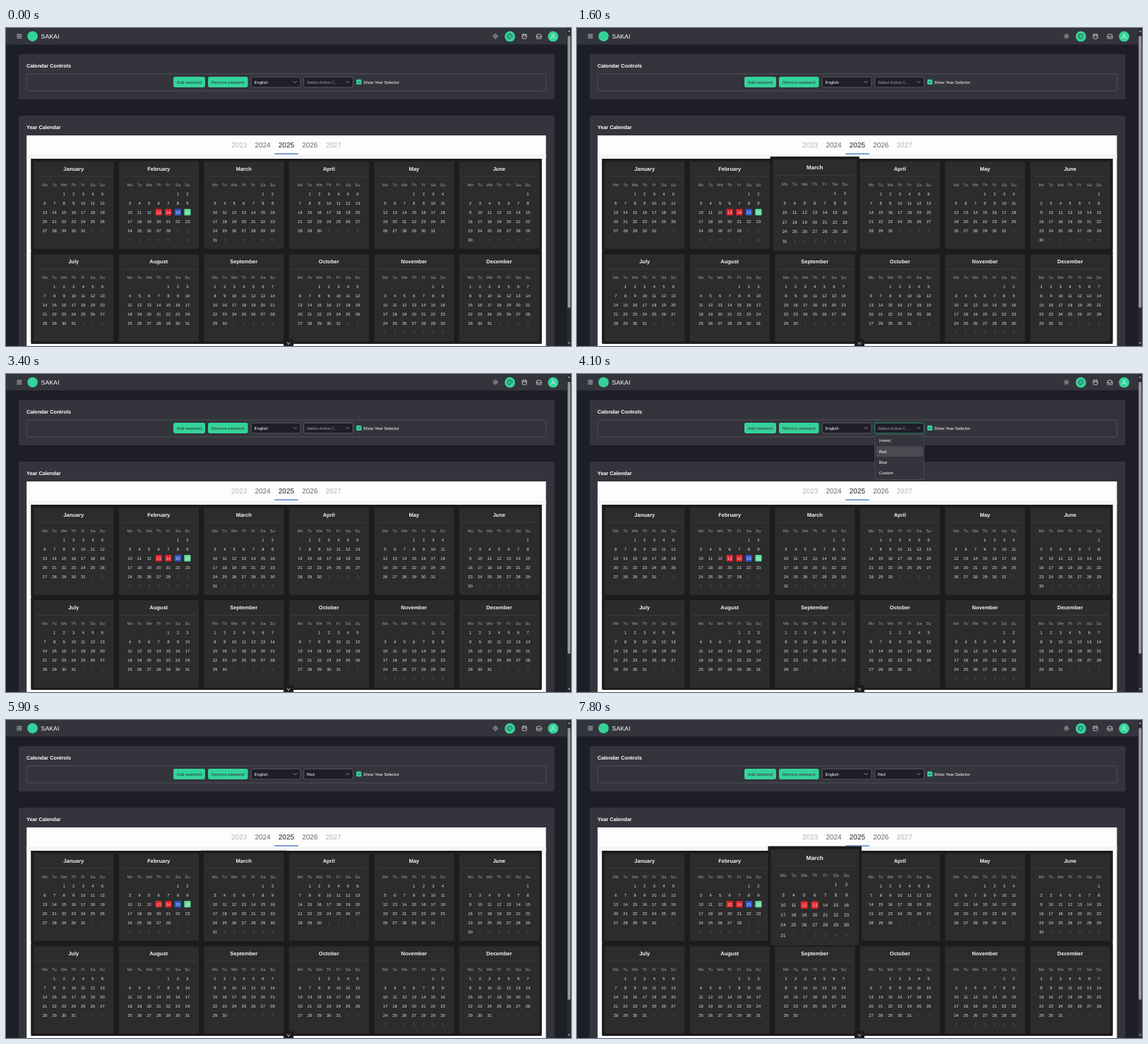
These frames come from a looping animation (800 by 450 pixels, 8 s). An HTML page:

```html
<!DOCTYPE html>
<html lang="en">
<head>
<meta charset="utf-8">
<title>Year calendar</title>
<style>
  html, body { margin: 0; width: 100%; height: 100%; overflow: hidden; background: #1d1e27; }
  svg { display: block; width: 800px; height: 450px; }
  text { font-family: "Liberation Sans", Arial, sans-serif; text-rendering: geometricPrecision; }
</style>
</head>
<body>
<svg id="stage" viewBox="0 0 800 450"></svg>
<script>
const LOOP = 8000;
const GREEN = '#34d399', CARD = '#34343d', GROUND = '#1d1e27', LINE = '#616268', RED = '#e0242b';
const stage = document.getElementById('stage');

function add(parent, tag, attrs) {
  const node = document.createElementNS('http://www.w3.org/2000/svg', tag);
  for (const key in attrs) node.setAttribute(key, attrs[key]);
  parent.appendChild(node);
  return node;
}

function rect(parent, x, y, width, height, fill, rx = 0, more = {}) {
  return add(parent, 'rect', { x, y, width, height, fill, rx, ...more });
}

function circle(parent, cx, cy, r, fill) {
  return add(parent, 'circle', { cx, cy, r, fill });
}

// y is the middle of the capital letters
function label(parent, x, y, str, size, fill, more = {}) {
  const node = add(parent, 'text', { x, y: y + size * 0.355, 'font-size': size, fill, ...more });
  node.textContent = str;
  return node;
}

function stroke(parent, d, color, width = 0.8) {
  return add(parent, 'path', {
    d, stroke: color, 'stroke-width': width, fill: 'none',
    'stroke-linecap': 'round', 'stroke-linejoin': 'round'
  });
}

const MID = { 'text-anchor': 'middle' };
const BOLD = { 'font-weight': 700 };
const SMALL = 5.83;

function drawPanels() {
  rect(stage, 0, 0, 800, 450, GROUND);
  for (const [y, h, title] of [[37, 64, 'Calendar Controls'], [124, 340, 'Year Calendar']]) {
    rect(stage, 18, y, 758.5, h, CARD, 2.5);
    label(stage, 29, y + 16.3, title, 7.29, '#fff', BOLD);
  }
  rect(stage, 29.2, 65, 735.3, 24, 'none', 2.5, { stroke: LINE, 'stroke-width': 0.6 });
}

function drawTopbar() {
  const ink = '#f2f2f3';
  rect(stage, 0, 0, 795, 23.2, CARD);
  for (const y of [9.2, 11.6, 14]) stroke(stage, `M15.8 ${y}h6.2`, ink);
  circle(stage, 37.6, 11.7, 7.3, GREEN);
  label(stage, 49.6, 11.7, 'SAKAI', 8.75, '#fff');

  add(stage, 'circle', { cx: 693, cy: 11.7, r: 1.6, fill: 'none', stroke: ink, 'stroke-width': 0.7 });
  for (let i = 0; i < 8; i++) {
    const c = Math.cos(i * Math.PI / 4), s = Math.sin(i * Math.PI / 4);
    stroke(stage, `M${693 + 2.8 * c} ${11.7 + 2.8 * s}L${693 + 3.5 * c} ${11.7 + 3.5 * s}`, ink, 0.7);
  }

  circle(stage, 713.5, 11.9, 7.4, GREEN);
  stroke(stage, 'M713.4 15.3a3.5 3.5 0 1 1 3.5-3.6c0 1.6-1.8 1.2-2.6 1.3c-1 .2 0 2.2-.9 2.3z', CARD, 0.75);
  for (const [x, y] of [[711.6, 11.9], [712.4, 10.2], [714.3, 10]]) circle(stage, x, y, 0.5, CARD);

  rect(stage, 731, 9, 6, 6, 'none', 0.8, { stroke: ink, 'stroke-width': 0.7 });
  stroke(stage, 'M731 11.2h6M732.6 8.3v1.2M735.4 8.3v1.2', ink, 0.7);

  stroke(stage, 'M752.4 9h4.4l1.2 2.8v2.6q0 .6-.6.6h-5.6q-.6 0-.6-.6v-2.6zM751.2 12h1.8l.7 1.1h1.8l.7-1.1h1.8', ink, 0.7);

  circle(stage, 774.7, 11.9, 7.4, GREEN);
  add(stage, 'circle', { cx: 774.7, cy: 10.2, r: 1.6, fill: 'none', stroke: ink, 'stroke-width': 0.75 });
  stroke(stage, 'M771.4 15.2v-.5q0-1.6 1.7-1.6h3.2q1.7 0 1.7 1.6v.5', ink, 0.75);
}

function drawSelect(x, str, color) {
  const box = rect(stage, x + 0.3, 69.2, 69.6, 14.7, GROUND, 2.2, { stroke: '#77787d', 'stroke-width': 0.6 });
  const text = label(stage, x + 4.6, 76.5, str, SMALL, color);
  stroke(stage, `M${x + 59.9} 75.4l2.3 2.3l2.3-2.3`, '#b5b5b9', 0.75);
  return { box, text };
}

function drawControls() {
  for (const [x, w, str] of [[237, 45, 'Add weekend'], [286, 56.5, 'Remove weekend']]) {
    rect(stage, x, 69, w, 15, GREEN, 2.4);
    label(stage, x + w / 2, 76.5, str, SMALL, CARD, MID);
  }
  drawSelect(347, 'English', '#fff');
  const select = drawSelect(421.4, 'Select Active C...', '#a5a5a9');
  rect(stage, 496, 72.8, 7.3, 7.3, GREEN, 1.5);
  stroke(stage, 'M497.9 76.6l1.3 1.3l2.4-2.7', CARD, 0.8);
  label(stage, 505.8, 76.5, 'Show Year Selector', SMALL, '#fff');
  return select;
}

function drawYears() {
  rect(stage, 29.2, 152, 735.3, 298, '#fdfdfd');
  rect(stage, 29.2, 179, 735.3, 6, '#f5f5f5');
  ['#b4b4b4', '#666', '#1f1f1f', '#666', '#b4b4b4'].forEach((color, i) =>
    label(stage, 330.2 + i * 33.35, 165.5, 2023 + i, 10, color, MID));
  rect(stage, 380.3, 177.4, 33.4, 1.3, '#3b6fc4');
  rect(stage, 35.5, 185, 723, 262, '#1c1c1c');
}

const NAMES = ['January', 'February', 'March', 'April', 'May', 'June', 'July',
  'August', 'September', 'October', 'November', 'December'];
const EVENTS = { 13: RED, 14: RED, 15: '#2f57c9', 16: '#5edc9c' };

function drawMonth(layer, index) {
  const cx = 95.7 + (index % 6) * 120.5;
  const top = 185 + Math.floor(index / 6) * 131.2;
  const group = add(layer, 'g', {});
  const marks = {};
  rect(group, cx - 60.25, top, 120.5, 129, '#1c1c1c');
  rect(group, cx - 56.6, top + 4, 113.4, 123.6, '#2c2c2c', 2);
  label(group, cx, top + 14.6, NAMES[index], 7.5, '#f4f4f4', { ...MID, ...BOLD });
  rect(group, cx - 53, top + 24.7, 106, 0.6, '#484848');

  const colX = i => cx + (i - 3) * 13.57;
  ['Mo', 'Tu', 'We', 'Th', 'Fr', 'Sa', 'Su'].forEach((day, i) =>
    label(group, colX(i), top + 37, day, SMALL, '#a3a3a3', MID));

  const offset = (new Date(2025, index, 1).getDay() + 6) % 7;
  const days = new Date(2025, index + 1, 0).getDate();
  const cells = offset > 4 ? 42 : 35;
  for (let i = offset; i < cells; i++) {
    const day = i - offset + 1;
    const x = colX(i % 7), y = top + 49.7 + Math.floor(i / 7) * 12.95;
    if (day > days) {
      label(group, x, y, Math.max(1, day - days - 1), SMALL, '#555', MID);
      continue;
    }
    const event = index === 1 && EVENTS[day];
    if (event || index === 2) {
      marks[day] = rect(group, x - 4.6, y - 4.7, 9.2, 9.4, event || 'none', 1.4);
    }
    label(group, x, y, day, SMALL, event && day === 16 ? '#d8f7e6' : '#e4e4e4', MID);
  }
  return { group, cx, cy: top + 64.5, marks };
}

function drawOverlay() {
  const group = add(stage, 'g', {});
  rect(group, 420.8, 87.6, 71.4, 64, '#000', 3, { opacity: 0.15 });
  rect(group, 421.6, 86, 69.8, 63.6, CARD, 2.4, { stroke: LINE, 'stroke-width': 0.6 });
  const focus = rect(group, 423.4, 102.3, 66.4, 14.6, '#4a4b52', 1.7);
  ['(none)', 'Red', 'Blue', 'Custom'].forEach((str, i) =>
    label(group, 427.5, 94.2 + i * 15.4, str, SMALL, '#fff'));
  return { group, focus };
}

function drawChrome() {
  add(stage, 'path', { d: 'M393 450v-6q0-4 4-4h6q4 0 4 4v6z', fill: '#1b1b1d' });
  stroke(stage, 'M398.2 444.6l1.8 3.4l1.8-3.4', '#d8d8d8', 0.8);
  rect(stage, 794.4, 0, 5.6, 450, '#2b2b2d');
  rect(stage, 795.3, 11, 3.8, 385, '#9b9b9b', 1.9);
  add(stage, 'path', { d: 'M795.4 5.4h3.6l-1.8-2.4zM795.4 444.8h3.6l-1.8 2.4z', fill: '#a8a8a8' });
}

drawPanels();
drawTopbar();
const select = drawControls();
drawYears();
const layer = add(stage, 'g', {});
const months = NAMES.map((name, i) => drawMonth(layer, i));
const march = months[2], august = months[7];
layer.append(august.group, march.group);
const overlay = drawOverlay();
drawChrome();

const ease = p => p * p * (3 - 2 * p);
const ramp = (t, from, to) => ease(Math.min(1, Math.max(0, (t - from) / (to - from))));

function zoom(month, amount) {
  const s = 1 + amount;
  month.group.setAttribute('transform',
    `translate(${month.cx * (1 - s)} ${month.cy * (1 - s)}) scale(${s})`);
}

function draw(t) {
  zoom(august, 0.035 * (ramp(t, 1050, 1200) - ramp(t, 1200, 1420)));
  zoom(march, 0.07 * (ramp(t, 1180, 1480) - ramp(t, 1480, 1800)) + 0.1 * ramp(t, 5850, 6250));

  const open = t >= 3500 && t < 5700;
  const hover = t >= 3200 && t < 3500;
  select.box.setAttribute('stroke', open ? GREEN : hover ? '#8e8f93' : '#77787d');
  const chosen = t >= 4200;
  select.text.textContent = chosen ? 'Red' : 'Select Active C...';
  select.text.setAttribute('fill', chosen ? '#fff' : '#a5a5a9');

  const shown = ramp(t, 3480, 3620);
  const grow = 0.8 + 0.2 * shown;
  overlay.group.setAttribute('opacity', shown - ramp(t, 5650, 5780));
  overlay.group.setAttribute('transform', `translate(0 ${86 * (1 - grow)}) scale(1 ${grow})`);
  overlay.focus.setAttribute('y', t < 3850 ? 86.9 : 102.3);
  overlay.focus.setAttribute('opacity', t < 3700 ? 0 : 1);

  const mark = (day, color) => march.marks[day].setAttribute('fill', color);
  mark(18, t >= 6350 && t < 6500 ? '#484848' : 'none');
  mark(12, t >= 7100 ? RED : t >= 6500 ? '#484848' : 'none');
  mark(13, t >= 7700 ? RED : t >= 7200 ? '#484848' : 'none');
}

const start = performance.now();
function tick() {
  draw((performance.now() - start) % LOOP);
  requestAnimationFrame(tick);
}
tick();
</script>
</body>
</html>
```
